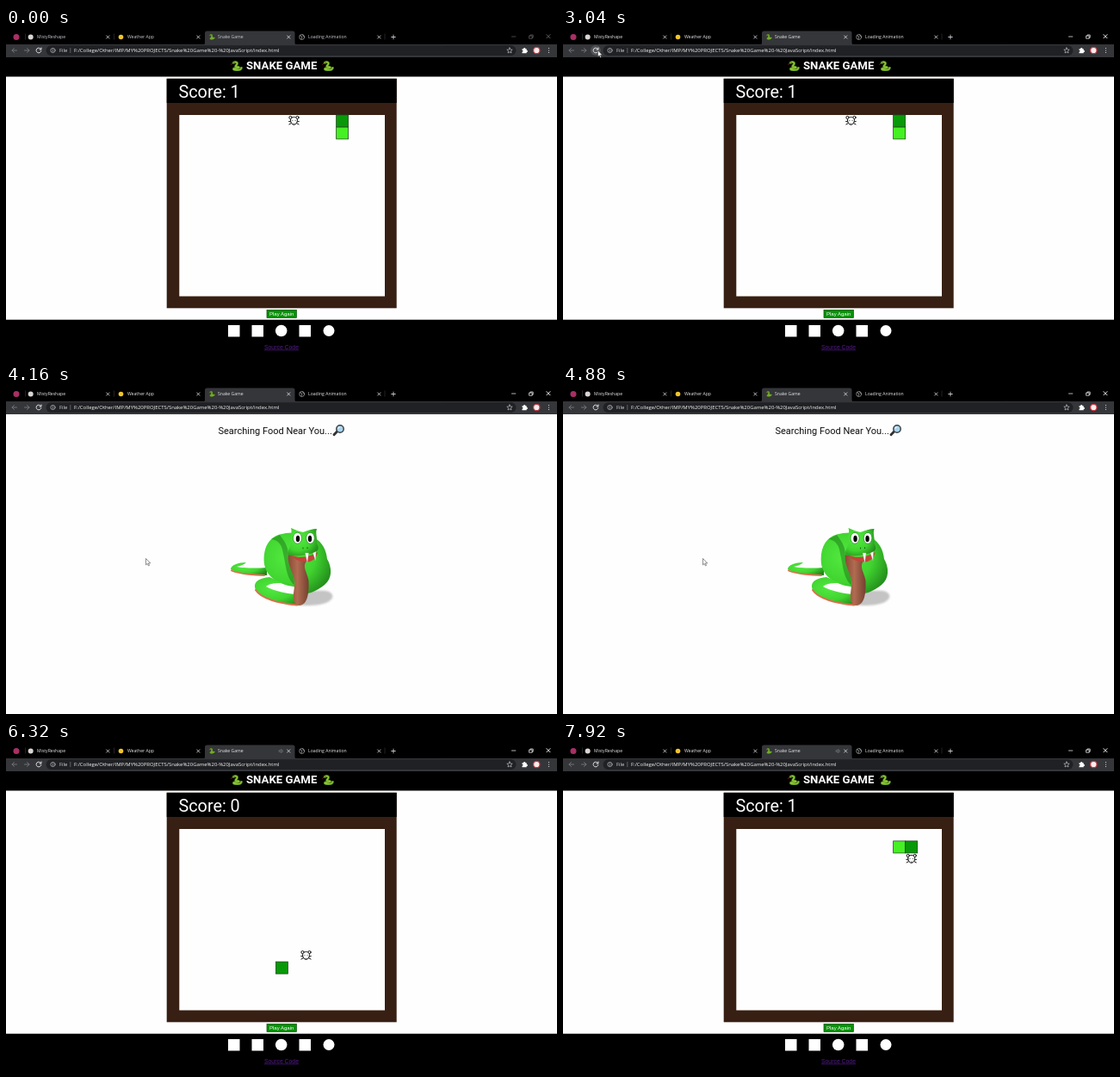
Recreate the animation shown at these times as an HTML page. Size 640 px wide and 382 px high, loop 8000 ms.

```html
<!DOCTYPE html>
<html lang="en">
<head>
<meta charset="utf-8">
<title>Snake Game</title>
<style>
  html, body { margin: 0; width: 100%; height: 100%; overflow: hidden; background: #fefefe; }
  svg { display: block; width: 640px; height: 382px; }
  .ui { font-family: "Open Sans", "Noto Sans", sans-serif; }
  .tab { font-size: 5.1px; }
  .page { font-family: Roboto, sans-serif; }
  .btn { font-family: "Liberation Sans", Arial, sans-serif; }
  .line { fill: none; stroke-linecap: round; stroke-linejoin: round; }
</style>
</head>
<body>
<svg viewBox="0 0 640 382">
  <defs>
    <radialGradient id="skin" cx=".35" cy=".4" r=".75">
      <stop offset="0" stop-color="#52ea40"/>
      <stop offset=".55" stop-color="#41d430"/>
      <stop offset="1" stop-color="#1f8519"/>
    </radialGradient>
    <linearGradient id="belly">
      <stop offset="0" stop-color="#8a4a35"/>
      <stop offset=".45" stop-color="#b06c51"/>
      <stop offset="1" stop-color="#744030"/>
    </linearGradient>
    <filter id="soft"><feGaussianBlur stdDeviation="1.3"/></filter>
    <g id="emoji" class="line">
      <path id="coil" d="M3.200 2.600C6 .8 8.600 2.600 7 4.800C5.500 6.800 4.600 7.300 7.500 7.400C10.500 7.500 10.200 9 7 9C2.500 9 2 10.800 6.500 11C9.500 11.200 12 10.600 12.400 8.600" stroke="#4c7d16" stroke-width="2.700"/>
      <use href="#coil"/>
      <path d="M3.200 2.600C6 .8 8.600 2.600 7 4.800C5.500 6.800 4.600 7.300 7.500 7.400C10.500 7.500 10.200 9 7 9C2.500 9 2 10.800 6.500 11C9.500 11.200 12 10.600 12.400 8.600" stroke="#8fc63a" stroke-width="1.500"/>
      <path d="M2 3.400L.8 4.600" stroke="#d5382c" stroke-width=".7"/>
      <circle cx="4" cy="2.200" r=".5" fill="#111"/>
    </g>
    <g id="close" class="line"><path d="M-1.6-1.6L1.6 1.6M1.6-1.6L-1.6 1.6"/></g>
  </defs>

  <rect width="640" height="382" fill="#fefefe"/>

  <!-- game page -->
  <g id="game">
    <rect y="33" width="640" height="23.500"/>
    <use href="#emoji" x="261" y="37.700"/>
    <use href="#emoji" x="367" y="37.700"/>
    <text class="page" x="279" y="48.400" font-size="13.200" font-weight="700" fill="#fff">SNAKE GAME</text>
    <rect x="186.700" y="58.800" width="267" height="266.500" fill="#371f13"/>
    <rect x="186.700" y="58.800" width="267" height="28.200"/>
    <text id="score" class="page" x="200.500" y="81.300" font-size="19.800" fill="#fff">Score: 1</text>
    <rect x="201.300" y="101" width="238.700" height="210.500" fill="#fefefe"/>
    <g stroke="#1b3a17" stroke-width=".7">
      <rect id="tail" width="14" height="14" fill="#45f023"/>
      <rect id="head" width="14" height="14" fill="#089908"/>
    </g>
    <g id="food" class="line" stroke="#111" stroke-width="1">
      <path d="M-5.800 1.600L-3.600 2M-5.600 5L-3 3.700M5.800 1.600L3.600 2M5.600 5L3 3.700"/>
      <circle cx="-4" cy="-3" r="1.600" fill="#fff"/>
      <circle cx="4" cy="-3" r="1.600" fill="#fff"/>
      <path d="M-4 .2C-3.800-4.800 3.800-4.800 4 .2C4 3 1.800 5.500 0 5.500C-1.800 5.500-4 3-4 .2Z" fill="#fff"/>
      <path d="M-1.600 .6v.1M1.600 .6v.1M-.4 4.300h.8" stroke-width=".8"/>
    </g>
    <rect x="303" y="327.400" width="34.400" height="9" fill="#089108" stroke="#0a4d0a" stroke-width=".7"/>
    <text class="btn" x="306" y="334" font-size="6" fill="#fff">Play Again</text>
    <rect y="338.700" width="640" height="44"/>
    <g fill="#fff">
      <rect x="258" y="345" width="13.500" height="13.500"/>
      <rect x="285.500" y="345" width="13.500" height="13.500"/>
      <circle cx="319.700" cy="351.500" r="6.800"/>
      <rect x="340.500" y="345" width="13.500" height="13.500"/>
      <circle cx="375" cy="351.500" r="6.500"/>
    </g>
    <text class="btn" x="300" y="372.600" font-size="6.850" fill="#551a8b" text-decoration="underline">Source Code</text>
  </g>

  <!-- loading page -->
  <g id="loading">
    <text class="page" x="246.500" y="57" font-size="11" fill="#111">Searching Food Near You...</text>
    <g class="line">
      <path d="M384.600 54L381 57.800" stroke="#333" stroke-width="2.800"/>
      <circle cx="388" cy="51" r="4.200" fill="#a9d4ee" stroke="#3a4248" stroke-width="1.500"/>
      <path d="M385.800 50.500Q386.200 48.700 388 48.600" stroke="#fff" stroke-width=".9"/>
    </g>
    <path d="M318 252C330 240 350 238 372 239C384 242 381 252 364 255C350 257 332 256 318 252Z" fill="#c4c4c4" filter="url(#soft)"/>
    <g fill="url(#skin)">
      <path d="M279 206C270 206 261 209 261 214C268 219 288 221 303 221V212C290 213 275 212.500 268 211C272 210 276 209 279 206Z"/>
      <path class="line" d="M262 215.500C270 219 288 221 300 221" stroke="#d8714f" stroke-width="1.900"/>
      <path d="M300 208C298 190 305 177 318 173.500C330 170 345 171 358 177C368 183 372 192 373 202C379 212 379 225 370 232C361 239 354 242 345 243L334 234C318 232 303 224 300 208Z"/>
      <path d="M306 223C296 224 288 227 289 235C292 247 318 254 338 256C345 255 348 250 346 244C328 243 310 239 302 234C306 230 314 230 322 230Z"/>
      <path class="line" d="M290 238C296 248 317 253.500 338 255.500" stroke="#d8714f" stroke-width="2"/>
      <path d="M318 174C322 180 328 186 328 198C330 212 336 222 335 232C326 226 325 208 322 196C321 188 318 180 308 179Z" fill="#176b14" opacity=".45"/>
    </g>
    <path d="M328 197C326 209 335 219 335.500 230C334 243 331 255 341 256C351 255 352 240 351.500 227C350 217 343 211 350 203Z" fill="url(#belly)"/>
    <g id="face">
      <path d="M330 197C340 202 353 200 362 194C361 202 354 207 347 205C340 205 334 202 330 197Z" fill="#c2453a"/>
      <path d="M331 166C336 168 340 170 345 171C350 169 356 167 361 167C359 172 362 178 361 184C365 190 362 195 352 196C345 198 334 200 328 197C326 192 331 188 331 182C329 177 333 172 331 166Z" fill="url(#skin)"/>
      <path d="M347.500 195L351.500 195L350 206.500ZM356.500 195L360 193.500L359.500 204Z" fill="#fff" stroke="#aaa" stroke-width=".3"/>
      <g fill="#fff" stroke="#1c7a18" stroke-width=".6">
        <ellipse cx="338.500" cy="177.800" rx="5" ry="6.400"/>
        <ellipse cx="353.500" cy="177.800" rx="4.800" ry="6.400"/>
      </g>
      <ellipse cx="339" cy="178.500" rx="2.200" ry="3.800"/>
      <ellipse cx="353" cy="178.500" rx="2.200" ry="3.800"/>
      <path class="line" d="M345 189v1M350 188.700v1" stroke="#14610f"/>
    </g>
  </g>

  <!-- browser -->
  <g class="ui">
    <rect width="640" height="19.500"/>
    <path d="M229 19.500Q231 19.500 231 17V6Q231 3.500 233.500 3.500H333Q335.500 3.500 335.500 6V17Q335.500 19.500 337.500 19.500Z" fill="#35363a"/>
    <rect y="19" width="640" height="15" fill="#35363a"/>
    <rect x="46.500" y="20.300" width="546" height="11.600" rx="5.800" fill="#202124"/>
    <path d="M22.500 6.500v7M125.500 6.500v7M440 6.500v7" stroke="#3a3b3e" stroke-width=".6"/>
    <circle cx="12" cy="10.500" r="3.500" fill="#a82f64"/>
    <circle cx="28.700" cy="10.500" r="3" fill="#d9d5d3"/>
    <circle cx="133.500" cy="10.500" r="2.800" fill="#f0c52c"/>
    <use href="#emoji" transform="translate(235.500 7) scale(.52)"/>
    <g class="line" stroke="#a9abae" stroke-width=".7">
      <circle cx="343.700" cy="10.500" r="3"/>
      <path d="M341.500 8.700L344 10L343 13M344.500 7.700L346 10"/>
    </g>
    <g id="tabs" class="tab">
      <text x="36" y="12.300">MistyReshape</text>
      <text x="141" y="12.300">Weather App</text>
      <text x="246" y="12.300">Snake Game</text>
      <text x="351" y="12.300">Loading Animation</text>
    </g>
    <g stroke="#e4e5e7" stroke-width=".8">
      <use href="#close" x="118.300" y="10.500"/>
      <use href="#close" x="223.300" y="10.500"/>
      <use href="#close" x="328.300" y="10.500"/>
      <use href="#close" x="433.300" y="10.500"/>
      <path d="M447.300 10.500h5.400M450 7.800v5.400"/>
    </g>
    <g id="sound" class="line" stroke="#85878a" stroke-width=".6">
      <path d="M317.500 9.700h1l1.300-1.200v4l-1.300-1.200h-1ZM321 9.200q.8 1.300 0 2.600"/>
    </g>
    <g id="controls" class="line" stroke="#fff" stroke-width=".7">
      <path d="M587.500 10h4.400M608 9h3.200v3.200H608ZM609 9V8h3.200v3.200h-1"/>
      <use href="#close" transform="translate(630 9.700) scale(1.300)"/>
    </g>
    <circle id="hover" cx="38" cy="26" r="6" fill="#505155"/>
    <g class="line" stroke-width=".9">
      <path d="M12.500 26H7M9.500 23.500L7 26L9.500 28.500M21.500 26H27M24.500 23.500L27 26L24.500 28.500" stroke="#77797c"/>
      <path d="M40.600 24.600A2.900 2.900 0 1 0 40.900 26.600M41 22.900V25H38.900" stroke="#eee"/>
      <circle cx="54.500" cy="26" r="2.600" stroke="#c4c6c9" stroke-width=".7"/>
      <path d="M54.500 25.900v1.300M54.500 24.600v.1" stroke="#c4c6c9" stroke-width=".7"/>
      <path d="M585 22.900L585.900 25L588.200 25.200L586.500 26.700L587 29L585 27.800L583 29L583.500 26.700L581.800 25.200L584.100 25Z" stroke="#d5d6d8" stroke-width=".6"/>
    </g>
    <path d="M599.500 24.200h1.500a1.200 1.200 0 0 1 2.400 0h1.300v1.500a1.200 1.200 0 0 1 0 2.400v1.100h-5.200v-1.500a1 1 0 0 0 0-2Z" fill="#fff"/>
    <circle cx="616.300" cy="26" r="3.700" fill="#f7eeee" stroke="#c93843" stroke-width="1.200"/>
    <path class="line" d="M630.500 23.500v.01M630.500 26v.01M630.500 28.500v.01" stroke="#e8e8e8" stroke-width="1.200"/>
    <text x="62" y="28.100" font-size="5.900" fill="#d4d6d9">File</text>
    <path d="M74.800 23v6" stroke="#8a8c8f" stroke-width=".6"/>
    <text x="79" y="28.100" font-size="5.950" fill="#f4f4f4">F:/College/Other/IMP/MY%20PROJECTS/Snake%20Game%20-%20JavaScript/index.html</text>
  </g>

  <path id="cursor" d="M0 0V7.400L1.700 5.800L2.900 8.400L4 7.900L2.900 5.400H5.200Z" fill="#fff" stroke="#222" stroke-width=".5"/>
</svg>

<script>
const LOOP = 8000, STEP = 80;
const FOCUS = 2000, RELOAD = 3280, READY = 5120, START = 6000, EAT = 6880;
const MOVES = 'D'.repeat(6) + 'RR' + 'U'.repeat(12) + 'RRRR';
const DIRS = { D: [0, 1], R: [1, 0], U: [0, -1] };
const POINTER = [
  [1040, 182, 128], [1280, 195, 96.5], [2080, 195, 96.5],
  [2640, 40.5, 26], [3680, 40.5, 26], [4080, 162.5, 201.5]
];

const $ = id => document.getElementById(id);
const show = (id, on) => $(id).setAttribute('display', on ? 'inline' : 'none');
const move = (id, x, y) => $(id).setAttribute('transform', `translate(${x} ${y})`);
const cell = ([col, row]) => [201 + col * 14.05, 100.9 + row * 14.02];

const trail = [[8, 7]];
for (const m of MOVES) {
  const [x, y] = trail.at(-1), [dx, dy] = DIRS[m];
  trail.push([x + dx, y + dy]);
}

function pointerAt(t) {
  const i = POINTER.findIndex(p => p[0] > t);
  if (i < 1) return POINTER.at(i).slice(1);
  const [t0, x0, y0] = POINTER[i - 1], [t1, x1, y1] = POINTER[i];
  const k = (t - t0) / (t1 - t0), e = k * k * (3 - 2 * k);
  return [x0 + (x1 - x0) * e, y0 + (y1 - y0) * e];
}

// Head, tail and food cells at time t
function board(t) {
  if (t < RELOAD) return [[13, 0], [13, 1], [9, 0]];
  const n = Math.min(Math.max(Math.floor((t - START) / STEP), 0), MOVES.length);
  return t < EAT ? [trail[n], null, [10, 10]] : [trail[n], trail[n - 1], [14, 2]];
}

function draw(t) {
  const loading = t >= RELOAD && t < READY;
  show('game', !loading);
  show('loading', loading);
  show('cursor', t >= 1040 && t < READY);
  show('hover', t >= 2560 && t < 3760);
  show('sound', t >= START + STEP);
  $('controls').setAttribute('opacity', t < FOCUS ? 0.4 : 1);
  $('tabs').setAttribute('fill', t < FOCUS ? '#c8cacd' : '#e6e7e9');
  move('cursor', ...pointerAt(t));
  move('face', Math.sin((t - 4160) / 300) * 0.8, 0);

  const [head, tail, food] = board(t);
  const [fx, fy] = cell(food);
  move('head', ...cell(head));
  show('tail', tail);
  if (tail) move('tail', ...cell(tail));
  move('food', fx + 7, fy + 6);
  $('score').textContent = 'Score: ' + (t >= RELOAD && t < EAT ? 0 : 1);
}

const begin = performance.now();
function tick() {
  draw((performance.now() - begin) % LOOP);
  requestAnimationFrame(tick);
}
tick();
</script>
</body>
</html>
```
